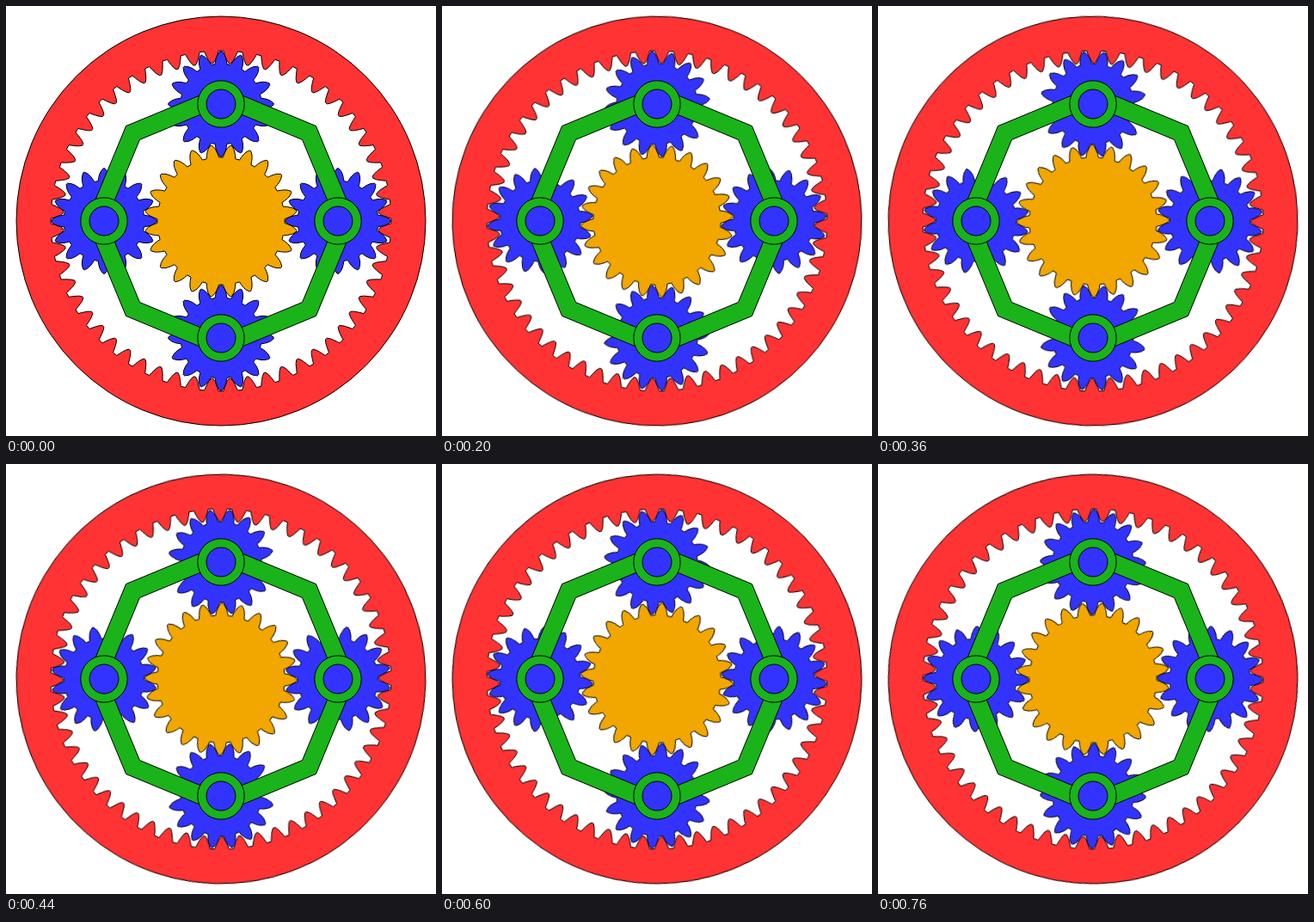
Animation of 500x500 px, one loop 0.8 s. Source, as an HTML page:

```html
<!DOCTYPE html>
<html lang="en">
<head>
<meta charset="utf-8">
<title>Planetary gear</title>
<style>
  html, body { margin: 0; width: 100%; height: 100%; overflow: hidden; background: #fff; }
  svg { display: block; width: 500px; height: 500px; stroke: #000; stroke-width: 1; stroke-linejoin: round; }
  .spin { transform-origin: 0 0; animation: spin 800ms steps(20) infinite; }
  @keyframes spin { to { transform: rotate(var(--pitch)); } }
  .ring { fill: #f33; }
  .sun { fill: #f2a600; }
  .planet { fill: #33f; }
  .carrier { fill: #1ab31a; }
</style>
</head>
<body>
<svg width="500" height="500"><g id="stage" transform="translate(250 250)"></g></svg>
<script>
  const MODULE = 6.8, SUN = 24, PLANET = 16, RING = SUN + 2 * PLANET;
  const ORBIT = MODULE * (SUN + PLANET) / 2;
  const TAU = 2 * Math.PI;
  const stage = document.getElementById('stage');

  function add(parent, tag, attrs) {
    const el = document.createElementNS('http://www.w3.org/2000/svg', tag);
    for (const key in attrs) el.setAttribute(key, attrs[key]);
    return parent.appendChild(el);
  }

  const polar = (r, a) => (r * Math.sin(a)).toFixed(2) + ' ' + (-r * Math.cos(a)).toFixed(2);
  const polygon = points => 'M' + points.join('L') + 'Z';

  // Outline of a gear; side is 1 for outward teeth, -1 for inward ones.
  // Each flank pairs a height in modules with a half width in radians.
  function gearPath(teeth, side, toothAtTop) {
    const pitch = TAU / teeth, step = pitch / 16;
    const flank = [
      [-1.1, 6 * step],
      [-0.5, 5 * step],
      [0, 4 * step],
      [0.5, 3 * step - teeth ** -1.7],
      [1, 2 * step - teeth ** -1.2]
    ];
    const profile = [
      ...flank.map(([h, w]) => [h, -w]),
      [1, 0],
      ...flank.reverse()
    ];
    const points = [];
    for (let i = 0; i < teeth; i++) {
      const mid = (i + (toothAtTop ? 0 : 0.5)) * pitch;
      for (const [h, w] of profile) {
        points.push(polar(MODULE * (teeth / 2 + side * h), mid + w));
      }
    }
    return polygon(points);
  }

  function addGear(parent, name, teeth, direction, d) {
    add(parent, 'path', {
      class: name + ' spin',
      d,
      'fill-rule': 'evenodd',
      style: `--pitch:${direction * 360 / teeth}deg`
    });
  }

  const circlePath = r => `M${-r} 0A${r} ${r} 0 1 1 ${r} 0A${r} ${r} 0 1 1 ${-r} 0Z`;
  const octagon = r => polygon(Array.from({ length: 8 }, (_, i) => polar(r, i * TAU / 8)));
  const mounts = [0, 1, 2, 3].map(i => `translate(${polar(ORBIT, i * TAU / 4)})`);

  addGear(stage, 'ring', RING, -1, circlePath(238) + gearPath(RING, -1, false));
  addGear(stage, 'sun', SUN, 1, gearPath(SUN, 1, false));
  for (const transform of mounts) {
    addGear(add(stage, 'g', { transform }), 'planet', PLANET, -1, gearPath(PLANET, 1, true));
  }

  add(stage, 'path', { class: 'carrier', d: octagon(156.2) + octagon(133.7), 'fill-rule': 'evenodd' });
  for (const transform of mounts) {
    add(stage, 'circle', { class: 'carrier', r: 4 * MODULE, transform });
    add(stage, 'circle', { class: 'planet', r: 2.5 * MODULE, transform });
  }
</script>
</body>
</html>
```
